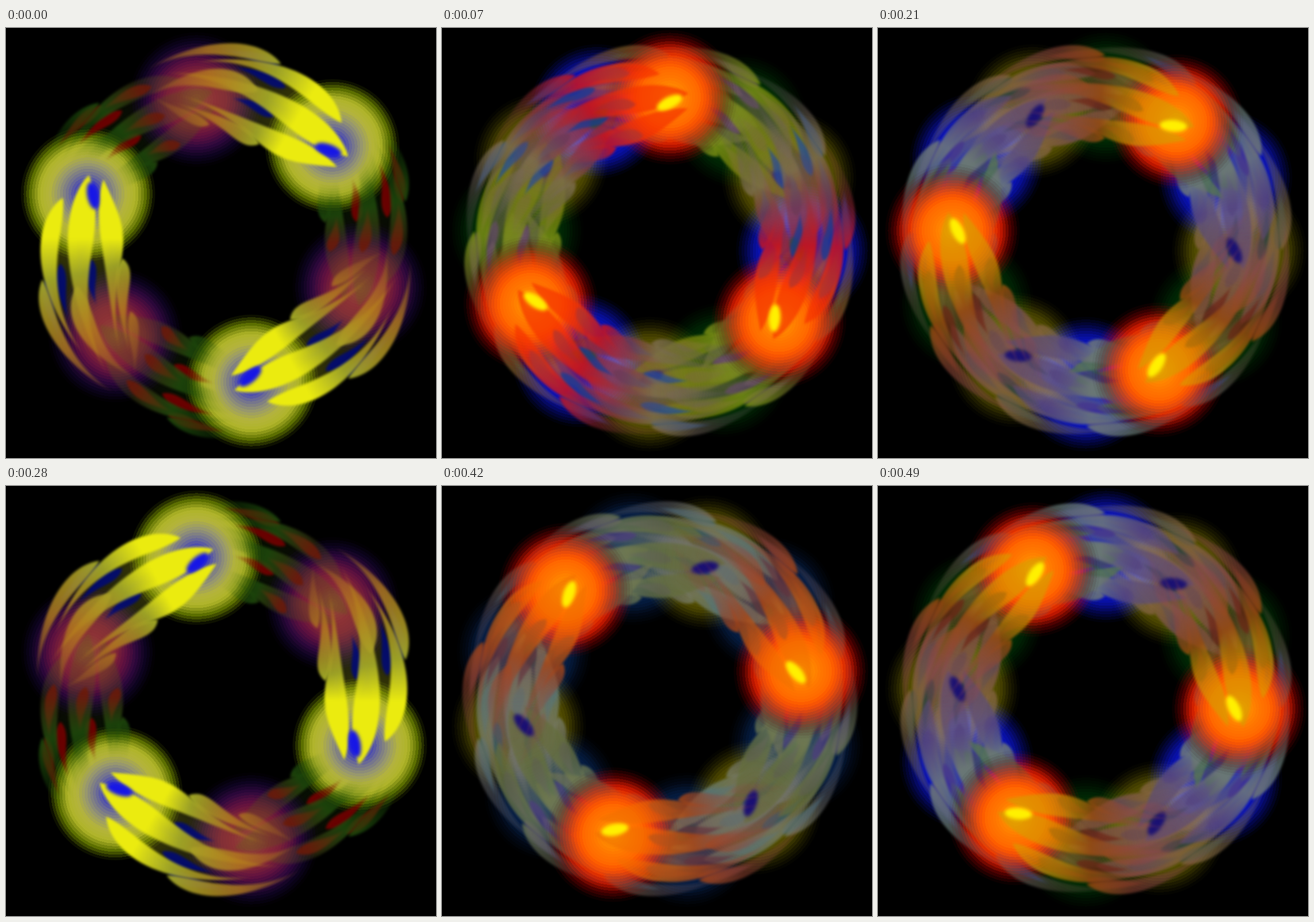
An HTML page with a canvas for the animation above (0.56 s loop, 748x748 px).

```html
<!DOCTYPE html>
<html lang="en">
<head>
<meta charset="utf-8">
<title>Ring of flames</title>
<style>
  html, body { margin: 0; width: 100%; height: 100%; overflow: hidden; background: #000; }
  canvas { display: block; width: 748px; height: 748px; }
</style>
</head>
<body>
<canvas width="748" height="748"></canvas>
<script>
const ctx = document.querySelector('canvas').getContext('2d');
const CX = 379, CY = 370, ORBIT = 250, GLOW_RADIUS = 117, BANDS = 24;
const STEP_MS = 70, STEPS = 8;
const rad = deg => deg * Math.PI / 180;

// Glow colours, evenly spaced from the middle to the rim.
const GLOWS = {
  gold: ['1818dc', '3c3cbe', '6e6e92', '969670', 'b4b43c', 'afb428', '5a6e00', '000000'],
  amber: ['ffaa00', 'ff8c00', 'ff7800', 'ff6a00', 'fa4600', 'c81900', '4b0000', '000000'],
  blue: ['0a14be', '0a14c8', '0a14c8', '0a14d2', '0a14c8', '080f9b', '030646', '000000'],
  olive: ['4a4650', '565046', '5a5532', '5f5a14', '5a5500', '464100', '1c1a00', '000000'],
  green: ['203424', '1e3220', '143214', '003208', '003006', '002304', '000f01', '000000'],
  teal: ['0c3068', '0c3068', '0a2c60', '082858', '06204c', '041838', '020814', '000000'],
  magenta: ['8c4638', '87323c', '821e3c', '78193c', '5a1040', '2d083c', '0c031e', '000000']
};

// Per phase, in painting order: start angle, glow, core, head, mid, tail, accent.
const look = (start, glow, core, head, mid, tail, accent) =>
  ({ start, glow, core, head, mid, tail, accent });
const PHASES = [
  [
    look(-101, 'magenta', '#0000', '#55501a55', '#1f4a0cdd', '#1d5a0a00', '#780000dd'),
    look(-41, 'gold', '#1616e6', '#ebeb0f', '#a5aa28ee', '#b47d1ecc', '#000a78dd')
  ], [
    look(-71, 'green', '#6e507888', '#82824699', '#96784bbb', '#b4782860', '#145a3c88'),
    look(-41, 'olive', '#0f0a82', '#82870ab0', '#7d9114d0', '#82783c60', '#6e4678aa'),
    look(-11, 'blue', '#0a6419', '#82323caa', '#7d6e50cc', '#645a5a50', '#1e50a0bb'),
    look(-101, 'amber', '#fff000', '#f53200b0', '#c8141ed8', '#8c3c4630', '#143c96bb')
  ], [
    look(-71, 'teal', '#0a465a', '#787850aa', '#827355bb', '#6e5a6450', '#285a78aa'),
    look(-11, 'teal', '#0a465a', '#6e8278aa', '#787d6ebb', '#6e6e7850', '#285a78aa'),
    look(-41, 'olive', '#0f0a78', '#646e3cbb', '#737d50bb', '#6e6e6450', '#503c82aa'),
    look(-101, 'amber', '#fff000', '#f06e0090', '#aa4614cc', '#8c464650', '#64323caa')
  ], [
    look(-11, 'green', '#142846aa', '#82505ab0', '#876446bb', '#87785060', '#143c46aa'),
    look(-71, 'blue', '#0a6419', '#508237bb', '#647d78cc', '#78645050', '#1432b4aa'),
    look(-41, 'olive', '#0a0a78', '#5a4b78b0', '#6e7878dd', '#647d7890', '#46328caa'),
    look(-101, 'amber', '#fff000', '#d2a00098', '#964b0fd0', '#8c465070', '#6e2314aa')
  ]
];

// Flame tongues: width, then tip, middle and end as [radius, degrees past the glow].
const TONGUES = [
  [24, [323, -31], [333, -50], [326, -74]],
  [24, [204, -56], [236, -68], [288, -76]],
  [36, [267, -36], [284, -55], [284, -76]],
  [27, [179, -29], [201, -48], [258, -70]],
  [46, [261, 7], [253, -27], [309, -68]],
  [40, [235, 8], [195, -27], [265, -66]],
  [32, [290, -4], [307, -28], [314, -58]]
];
const ACCENTS = [[304, -23], [249, -23], [193, -22], [324, -40], [295, -36], [241, -36]]
  .map(([r, d]) => [20, [r - 8, d + 9], [r, d], [r + 8, d - 10]]);

const channels = hex => [0, 2, 4].map(i => parseInt(hex.slice(i, i + 2), 16));

function glowColour(stops, t, alpha) {
  const at = t * (stops.length - 1), i = Math.min(stops.length - 2, Math.floor(at));
  const a = channels(stops[i]), b = channels(stops[i + 1]);
  return `rgba(${a.map((v, k) => Math.round(v + (b[k] - v) * (at - i)))}, ${alpha})`;
}

// A soft-edged glow can be laid over flames without darkening them at its rim.
function drawGlow({ glow }, angle, softEdge) {
  const x = CX + ORBIT * Math.cos(angle), y = CY + ORBIT * Math.sin(angle);
  const fill = ctx.createRadialGradient(x, y, 0, x, y, GLOW_RADIUS);
  for (let i = 0; i < BANDS; i++) {
    const t = (i + .5) / BANDS;
    const colour = glowColour(GLOWS[glow], t, softEdge ? Math.min(1, (1 - t) * 2) : 1);
    fill.addColorStop(i / BANDS, colour);
    fill.addColorStop((i + 1) / BANDS, colour);
  }
  ctx.filter = 'none';
  ctx.globalAlpha = 1;
  ctx.fillStyle = fill;
  ctx.beginPath();
  ctx.arc(x, y, GLOW_RADIUS, 0, 7);
  ctx.fill();
}

// Fills a curved leaf with a sharp tip, widest about a third of the way along.
function fillTongue(angle, [width, tip, middle, end]) {
  const left = [], right = [];
  for (let i = 0; i <= 28; i++) {
    const t = i / 28;
    const along = k => (2 * t - 1) * (t - 1) * tip[k] + 4 * t * (1 - t) * middle[k] + t * (2 * t - 1) * end[k];
    const half = width / 2 * Math.max(0, Math.sin(Math.PI * t ** .6)) ** 1.5;
    const a = angle + rad(along(1)), r = along(0);
    left.push([(r + half) * Math.cos(a), (r + half) * Math.sin(a)]);
    right.unshift([(r - half) * Math.cos(a), (r - half) * Math.sin(a)]);
  }
  ctx.beginPath();
  [...left, ...right].forEach(([x, y]) => ctx.lineTo(CX + x, CY + y));
  ctx.closePath();
  ctx.fill();
}

function flameFill({ head, mid, tail }, angle) {
  const fill = ctx.createConicGradient(angle - rad(80), CX, CY);
  const stop = (deg, colour) => fill.addColorStop((deg + 80) / 360, colour);
  stop(-80, tail.slice(0, 7) + '00');
  stop(-54, tail);
  stop(-32, mid);
  stop(-18, head);
  stop(12, head);
  stop(13, '#0000');
  return fill;
}

function drawFlame(item, angle, body) {
  const fill = flameFill(item, angle);
  ctx.filter = 'blur(9px)';
  ctx.globalAlpha = body;
  ctx.strokeStyle = fill;
  ctx.lineWidth = 100;
  ctx.beginPath();
  ctx.arc(CX, CY, 252, angle - rad(74), angle - rad(20));
  ctx.stroke();

  ctx.filter = 'blur(2px)';
  ctx.globalAlpha = 1;
  ctx.fillStyle = item.accent;
  ACCENTS.forEach(shape => fillTongue(angle, shape));
  ctx.fillStyle = fill;
  TONGUES.forEach(shape => fillTongue(angle, shape));
}

function drawCore({ core }, angle) {
  ctx.filter = 'blur(3px)';
  ctx.fillStyle = core;
  ctx.beginPath();
  ctx.ellipse(CX + 241 * Math.cos(angle), CY + 241 * Math.sin(angle), 24, 10, angle + rad(60), 0, 7);
  ctx.fill();
}

function drawStep(step) {
  const phase = step % 4, items = PHASES[phase], brightest = items[items.length - 1];
  const triple = (item, draw) => {
    for (let turn = 0; turn < 360; turn += 120) draw(item, rad(item.start + step * 15 + turn));
  };
  ctx.filter = 'none';
  ctx.globalAlpha = 1;
  ctx.fillStyle = '#000';
  ctx.fillRect(0, 0, 748, 748);
  ctx.globalCompositeOperation = 'screen';
  items.forEach(item => triple(item, (it, angle) => drawGlow(it, angle, false)));
  ctx.globalCompositeOperation = 'source-over';
  for (const item of items) {
    if (item === brightest) triple(item, (it, angle) => drawGlow(it, angle, true));
    triple(item, (it, angle) => drawFlame(it, angle, phase ? .4 : .25));
    triple(item, drawCore);
  }
}

let shown = -1;
const start = performance.now();
function tick() {
  const step = Math.floor(Math.max(0, performance.now() - start) / STEP_MS) % STEPS;
  if (step !== shown) drawStep(shown = step);
  requestAnimationFrame(tick);
}
tick();
</script>
</body>
</html>
```
